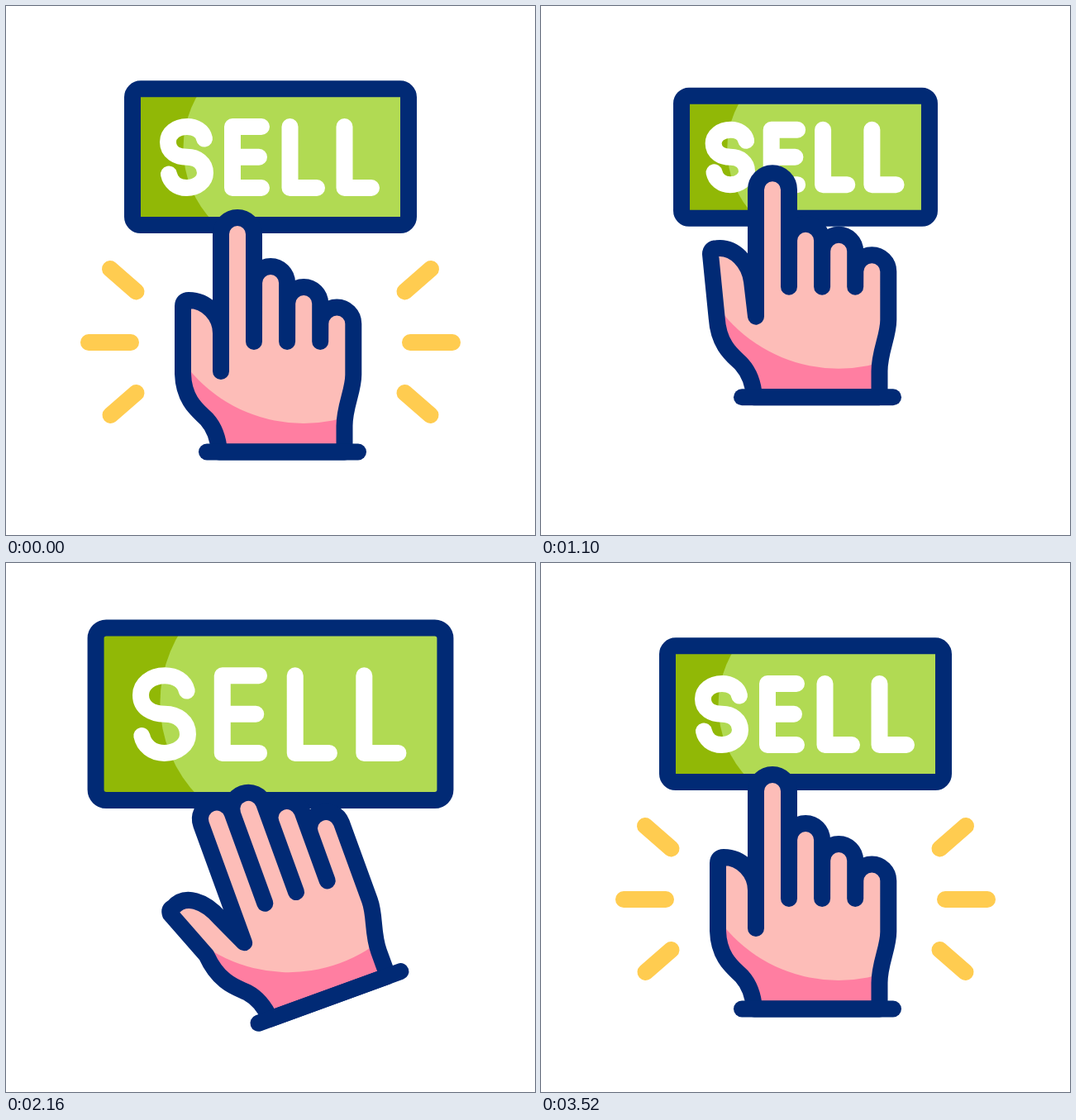
These frames come from a looping animation (640x640 px, 3.6 s). An HTML page with a canvas:

```html
<!DOCTYPE html>
<html lang="en">
<head>
<meta charset="utf-8">
<title>Sell button</title>
<style>
  html, body { margin: 0; width: 100%; height: 100%; overflow: hidden; background: #fff; }
  canvas { display: block; width: 640px; height: 640px; }
</style>
</head>
<body>
<canvas id="stage" width="640" height="640"></canvas>
<script>
const ctx = document.getElementById('stage').getContext('2d');
const LOOP = 3600, STEP = 20;
const NAVY = '#012a75', LIME = '#b1da53', OLIVE = '#91b806',
      SKIN = '#fdbdb8', ROSE = '#ff7ea1', GOLD = '#ffcc50';
const CENTER = { x: 320, y: 182.7 };   // button
const PIVOT = { x: 325, y: 380 };      // hand

// thumb: wrist joint, tip corner, arc start, two arc controls, arc end
const REST = {
  dx: 0, dy: 0, angle: 0, scale: 1,
  tips: [276, 335, 360, 384.5],
  thumb: [214, 445, 214, 363, 221, 356, 243, 356, 260, 375, 260, 396]
};
const PRESS = {
  dx: 0, dy: -66.3, angle: 0, scale: 0.796,
  tips: [301, 365, 366, 390.5],
  thumb: [211.5, 444, 196, 370, 204, 363, 226, 358, 244, 380, 250, 403]
};
const OPEN = {
  dx: -6.7, dy: -3.9, angle: -20, scale: 1.266,
  tips: [290, 292, 317.5, 346],
  thumb: [212, 441, 188, 379, 194, 372.5, 213, 362, 233, 378, 243, 405]
};
const TAP = { ...mix(PRESS, REST, 0.5), dy: PRESS.dy };
const SWIPED = { ...OPEN, dx: 86.1, dy: 22.1 };

const POSES = [
  [200, REST], [800, PRESS], [1100, TAP], [1400, PRESS],
  [2000, OPEN], [2800, SWIPED], [3400, REST]
];

function mix(a, b, k) {
  if (typeof a === 'number') return a + (b - a) * k;
  if (Array.isArray(a)) return a.map((v, i) => mix(v, b[i], k));
  return Object.fromEntries(Object.keys(a).map(key => [key, mix(a[key], b[key], k)]));
}

function ease(t, from, to) {
  const u = Math.min(1, Math.max(0, (t - from) / (to - from)));
  return u * u * (3 - 2 * u);
}

function poseAt(t) {
  for (let i = 1; i < POSES.length; i++) {
    const [from, a] = POSES[i - 1], [to, b] = POSES[i];
    if (t <= to) return mix(a, b, ease(t, from, to));
  }
  return REST;
}

function stroke(color, path) {
  ctx.strokeStyle = color;
  ctx.lineWidth = 20;
  ctx.stroke(path);
}

// Scales a path about the button centre while the line weight stays fixed
function scaled(path, k) {
  const out = new Path2D();
  out.addPath(path, new DOMMatrix([k, 0, 0, k, CENTER.x * (1 - k), CENTER.y * (1 - k)]));
  return out;
}

const frame = new Path2D();
frame.roundRect(153, 100.3, 334, 164.8, 10);

const highlight = new Path2D();
highlight.arc(342.5, 172, 128, Math.PI / 2, Math.PI * 1.5);
highlight.lineTo(500, 44);
highlight.lineTo(500, 300);
highlight.closePath();

const letters = new Path2D(
  'M240 160.5C238 151 229 146 219 146C206 146 196 154 196 164.5C196 177 207 182.7 219 182.7' +
  'C231 182.7 241 190 241 202C241 212 231 220 218.5 220C207 220 199 213 197 203.5' +
  'M309 146H274V220H309M274 182.7H306' +
  'M343.5 146V220H376M409.5 146V220H442');

function drawButton(k) {
  const edge = scaled(frame, k);
  ctx.save();
  ctx.clip(edge);
  ctx.fillStyle = OLIVE;
  ctx.fill(edge);
  ctx.fillStyle = LIME;
  ctx.fill(scaled(highlight, k));
  ctx.restore();
  stroke(NAVY, edge);
  stroke('#fff', scaled(letters, k));
}

function handPath({ tips, thumb }) {
  const p = new Path2D();
  const [jx, jy, cx, cy, ax, ay, ...arc] = thumb;
  p.moveTo(258, 539.5);
  p.bezierCurveTo(257, 525, 252, 510, 243, 500);
  p.bezierCurveTo(236, 492, 215, 480, jx, jy);
  p.lineTo(cx, cy);
  p.quadraticCurveTo(cx, ay, ax, ay);
  p.bezierCurveTo(...arc);
  p.lineTo(260, 442);
  tips.forEach((y, i) => {
    const x = 280 + 40.1 * i;
    p.arc(x, y, 20, Math.PI, 0);
    p.lineTo(x + 20, i < 3 ? 406 : 446);
  });
  p.bezierCurveTo(420.3, 466, 409.5, 484, 409.5, 508);
  p.lineTo(409.5, 539.5);
  p.closePath();
  return p;
}

const cuff = new Path2D('M243 539.5H426');
const palm = new Path2D();
palm.arc(360, 325, 180, 0, Math.PI * 2);

function drawHand(pose) {
  const hand = handPath(pose);
  ctx.save();
  ctx.translate(PIVOT.x + pose.dx, PIVOT.y + pose.dy);
  ctx.rotate(pose.angle * Math.PI / 180);
  ctx.translate(-PIVOT.x, -PIVOT.y);
  ctx.save();
  ctx.clip(hand);
  ctx.fillStyle = ROSE;
  ctx.fill(hand);
  ctx.fillStyle = SKIN;
  ctx.fill(palm);
  ctx.restore();
  stroke(NAVY, hand);
  stroke(NAVY, cuff);
  ctx.restore();
}

// inner end, outer end; mirrored for the right side
const RAYS = [[157.5, 345.5, 126, 318], [151, 407, 100, 407], [157.5, 468, 126.5, 495]];

function drawRays(k) {
  if (k <= 0) return;
  const p = new Path2D();
  for (const [x, y, ox, oy] of RAYS) {
    const ex = mix(x, ox, k), ey = mix(y, oy, k);
    p.moveTo(x, y);
    p.lineTo(ex, ey);
    p.moveTo(640 - x, y);
    p.lineTo(640 - ex, ey);
  }
  stroke(GOLD, p);
}

function draw(now) {
  const t = Math.floor((now % LOOP) / STEP) * STEP;
  const pose = poseAt(t);
  ctx.fillStyle = '#fff';
  ctx.fillRect(0, 0, 640, 640);
  ctx.lineCap = ctx.lineJoin = 'round';
  drawRays(1 - ease(t, 200, 520) + ease(t, 3200, 3520));
  drawButton(pose.scale);
  drawHand(pose);
}

const start = performance.now();
function tick() {
  draw(performance.now() - start);
  requestAnimationFrame(tick);
}
tick();
</script>
</body>
</html>
```
